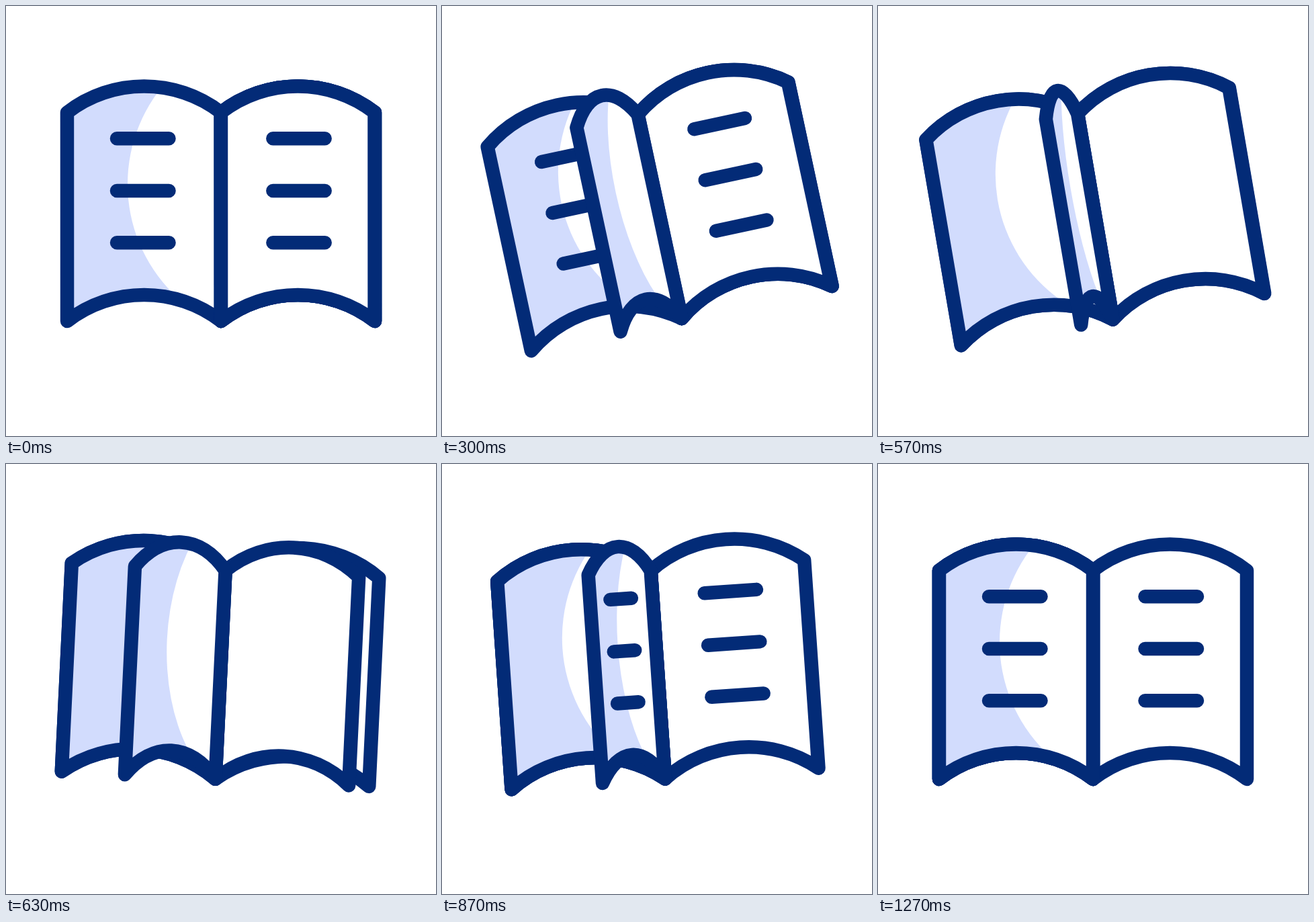
An HTML page with a canvas that plays this animation: 640x640 px, repeating every 1500 ms.

```html
<!DOCTYPE html>
<html lang="en">
<head>
<meta charset="utf-8">
<title>Book</title>
<style>
  html, body { margin: 0; height: 100%; overflow: hidden; background: #fff; }
  canvas { display: block; width: 640px; height: 640px; }
</style>
</head>
<body>
<canvas id="stage" width="640" height="640"></canvas>
<script>
const ctx = document.getElementById('stage').getContext('2d');
const INK = '#032b77', TINT = '#d2dcfd';
const LOOP = 1500, STEP = 1000 / 30, PHASE = 0.27;
const WIDTH = 229, TOP = -135.5, BOTTOM = 175;

// Times are in steps of 1/30 s.
const TILT = [[0, 0], [15, -18], [21.1, 8.5], [26, -4], [31, 2.6], [38, 0]];
const FLIP = 14.5;
const SHEETS = [
  { start: 0, front: true, back: false },
  { start: 9, front: true, back: false },
  { start: 17, front: false, back: true }
];

function ease(u) {
  u = Math.min(1, Math.max(0, u));
  return u * u * (3 - 2 * u);
}

function tiltAt(time) {
  let angle = 0;
  for (let i = 1; i < TILT.length; i++) {
    const [t0, a0] = TILT[i - 1], [t1, a1] = TILT[i];
    if (time >= t0) angle = a0 + (a1 - a0) * ease((time - t0) / (t1 - t0));
  }
  return angle * Math.PI / 180;
}

// The turn runs from 1 (flat on the right) to -1 (flat on the left).
function drawPage(turn, lined) {
  const x = u => u * turn;
  const page = new Path2D();
  page.moveTo(0, TOP);
  page.bezierCurveTo(x(67), TOP - 52, x(162), TOP - 52, x(WIDTH), TOP);
  page.lineTo(x(WIDTH), BOTTOM);
  page.bezierCurveTo(x(162), BOTTOM - 52, x(67), BOTTOM - 52, 0, BOTTOM);
  page.closePath();

  ctx.fillStyle = turn < 0 ? TINT : '#fff';
  ctx.fill(page);
  if (turn < 0) {
    ctx.save();
    ctx.clip(page);
    ctx.beginPath();
    ctx.ellipse(x(-91), -29, 230 * -turn, 230, 0, 0, 2 * Math.PI);
    ctx.fillStyle = '#fff';
    ctx.fill();
    ctx.restore();
  }
  ctx.stroke(page);

  if (lined) {
    ctx.beginPath();
    for (const y of [-96.7, -19, 58.3]) {
      ctx.moveTo(x(77.5), y);
      ctx.lineTo(x(155), y);
    }
    ctx.stroke();
  }
}

function draw(ms) {
  const time = Math.floor((ms % LOOP + 4) / STEP) + PHASE;
  ctx.fillStyle = '#fff';
  ctx.fillRect(0, 0, 640, 640);
  ctx.save();
  ctx.translate(320, 294);
  ctx.rotate(tiltAt(time));
  ctx.strokeStyle = INK;
  ctx.lineWidth = 20.5;
  ctx.lineCap = ctx.lineJoin = 'round';

  drawPage(-1, true);
  drawPage(1, true);
  const sheets = SHEETS.map(s => ({ ...s, turn: 1 - 2 * ease((time - s.start) / FLIP) }));
  const right = sheets.filter(s => s.turn >= 0).reverse();
  const left = sheets.filter(s => s.turn < 0);
  right.forEach(s => drawPage(s.turn, s.front));
  left.forEach(s => drawPage(s.turn, s.back));
  ctx.restore();
}

function tick() {
  draw(performance.now());
  requestAnimationFrame(tick);
}
tick();
</script>
</body>
</html>
```
